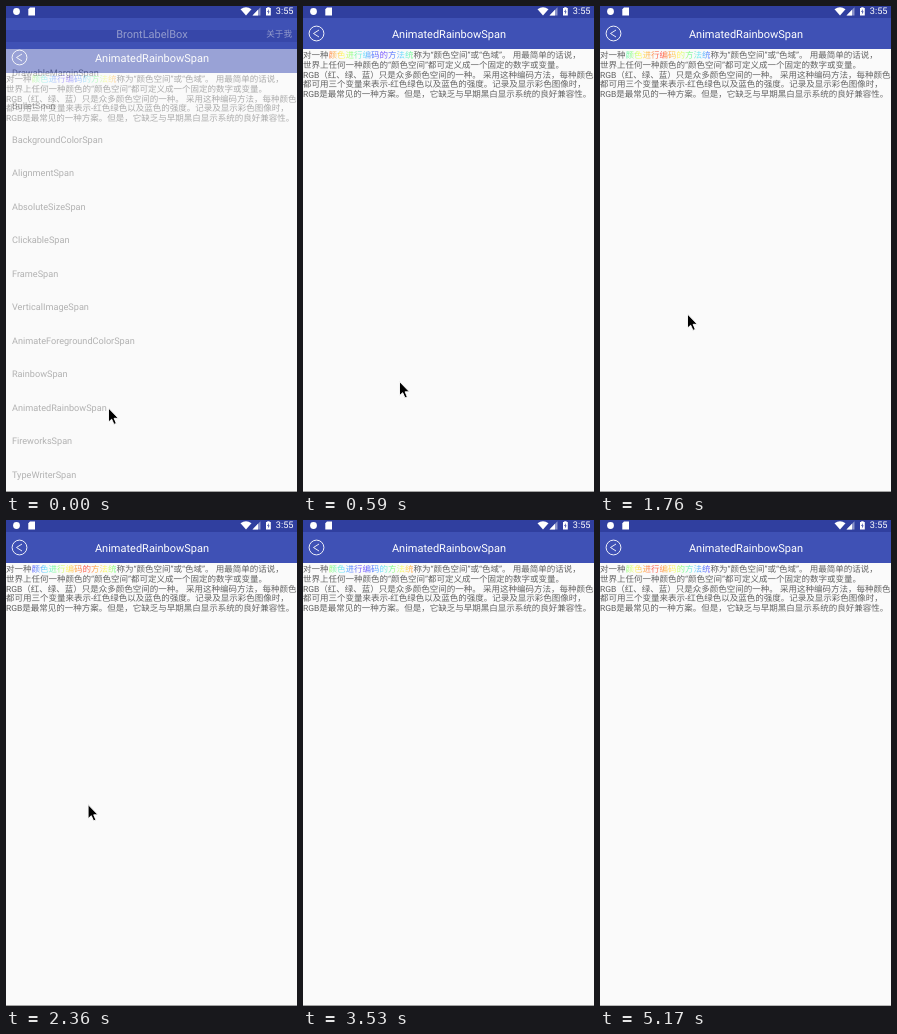
Recreate the animation shown at these times as an HTML page. Size 291 by 486 pixels, loop 5270 ms.

```html
<!DOCTYPE html>
<html lang="zh-CN">
<head>
<meta charset="utf-8">
<title>Rainbow span</title>
<style>
  html, body { margin: 0; width: 100%; height: 100%; overflow: hidden; }
  #stage {
    position: relative; width: 291px; height: 486px; overflow: hidden;
    background: #fafafa; white-space: nowrap;
    font-family: Roboto, "Noto Sans CJK SC", "Noto Sans CJK", sans-serif;
    text-rendering: geometricPrecision; text-spacing-trim: space-all;
  }
  #stage > *, .bar, .bar *, .body, .item { position: absolute; }
  .screen { left: 0; top: 0; width: 291px; height: 486px; background: #fafafa; }
  .strip { position: absolute; width: 291px; height: 12px; background: #303f9f; }
  .bar { top: 12px; width: 291px; height: 31px; background: #3f51b5; color: #fff; }
  .title { left: 0; width: 292px; top: 10px; font-size: 11px; line-height: 14px; text-align: center; }
  .about { right: 5px; top: 11px; font-size: 8.6px; line-height: 12px; }
  .back { left: 5px; top: 7px; }
  .item { left: 6px; font-size: 9.15px; line-height: 12px; color: #666; }
  .body { left: 0; top: 46px; font-size: 8.5px; line-height: 9.77px; color: #626262; }
  .rainbow {
    color: transparent;
    background: linear-gradient(90deg, #ff5252, #ffab50, #ffff6a, #7dff8a, #72e6ff, #5a7cff, #8358ff,
      #5a7cff, #72e6ff, #7dff8a, #ffff6a, #ffab50, #ff5252) 0 0 / 119px 100% repeat-x;
    -webkit-background-clip: text; background-clip: text;
  }
  #icons, #cursor { left: 0; top: 0; }
  #clock { right: 3.5px; top: 0; font-size: 9.2px; line-height: 11px; color: #fff; }
  #edge { left: 0; top: 485px; width: 291px; height: 1px; background: #a4a4a4; }
</style>
</head>
<body>
<div id="stage">
  <div class="screen" id="menu">
    <div class="strip"></div>
    <div class="bar"><div class="title">BrontLabelBox</div><div class="about">关于我</div></div>
  </div>
  <div class="screen" id="page">
    <div class="strip"></div>
    <div class="bar">
      <svg class="back" width="17" height="17" fill="none" stroke="#fff" stroke-width=".9">
        <circle cx="8.5" cy="8.5" r="7.4"/><path d="M11 5 5.5 8.5 11 12"/>
      </svg>
      <div class="title">AnimatedRainbowSpan</div>
    </div>
    <div class="body">对一种<span class="rainbow">颜色进行编码的方法统</span>称为“颜色空间”或“色域”。 用最简单的话说，<br>世界上任何一种颜色的“颜色空间”都可定义成一个固定的数字或变量。<br>RGB（红、绿、蓝）只是众多颜色空间的一种。 采用这种编码方法，每种颜色<br>都可用三个变量来表示-红色绿色以及蓝色的强度。记录及显示彩色图像时，<br>RGB是最常见的一种方案。但是，它缺乏与早期黑白显示系统的良好兼容性。</div>
  </div>
  <svg id="icons" width="291" height="12" fill="#fff">
    <circle cx="10.5" cy="5.5" r="3.4"/>
    <path d="M24 1.5H29V9.5H22.3V3.3Z"/>
    <path d="M234.5 3.2Q240 -.6 245.5 3.2L240 9.6Z"/>
    <path d="M254.5 1.2V9.5H246.5Z" opacity=".45"/>
    <path d="M252 3.8V9.5H246.5Z"/>
    <path d="M260 2H261.2V1.2H263.6V2H264.8V9.5H260Z"/>
    <path d="M263 3 261.1 6H262.3L261.8 8.4 263.7 5.4H262.5Z" fill="#303f9f"/>
  </svg>
  <div id="clock">3:55</div>
  <div id="edge"></div>
  <svg id="cursor" width="14" height="20">
    <path d="M.5 .6V14.6L3.7 11.7 6 16.9 8.3 15.9 6.1 10.8H10.4Z" fill="#000" stroke="#fff" stroke-width=".9"/>
  </svg>
</div>
<script>
  const LOOP = 5270, STEP = 147.7;
  const items = ["DrawableMarginSpan", "BulletSpan", "BackgroundColorSpan", "AlignmentSpan",
    "AbsoluteSizeSpan", "ClickableSpan", "FrameSpan", "VerticalImageSpan",
    "AnimateForegroundColorSpan", "RainbowSpan", "AnimatedRainbowSpan", "FireworksSpan",
    "TypeWriterSpan"];
  // Pointer path: [step, x, y]
  const path = [[0, 102, 401.5], [2, 101, 398], [4, 96, 375], [8, 87, 307.5],
    [15, 87, 307.5], [20, 60, 190], [21, 75, 220], [23, 198, 442]];

  const $ = s => document.querySelector(s);
  const menu = $("#menu"), page = $("#page"), rainbow = $(".rainbow");
  const cursor = $("#cursor"), edge = $("#edge");

  items.forEach((name, i) => {
    const el = document.createElement("div");
    el.className = "item";
    el.textContent = name;
    el.style.top = 62 + i * 33.46 + "px";
    menu.append(el);
  });

  function pointAt(n) {
    const k = Math.max(1, path.findIndex(p => p[0] >= n));
    const [a, b] = [path[k - 1], path[k]];
    const u = (n - a[0]) / (b[0] - a[0]);
    return [1, 2].map(j => a[j] + (b[j] - a[j]) * u);
  }

  function draw(n) {
    // The new screen rises and fades in, slowing down
    const t = 33 + n * STEP;
    const rise = 39 * Math.max(0, 1 - t / 350) ** 5;
    page.style.transform = `translateY(${Math.round(rise)}px)`;
    page.style.opacity = 1 - Math.max(0, 1 - t / 200) ** 4;

    rainbow.style.backgroundPositionX = 34 + (n - 12) * 4.92 + "px";

    const shown = n <= 23;
    cursor.style.visibility = shown ? "visible" : "hidden";
    if (shown) {
      const [x, y] = pointAt(n);
      cursor.style.transform = `translate(${x}px, ${y}px)`;
    }
    edge.style.background = n < 33 ? "#a4a4a4" : "#b8b8b8";
  }

  const start = performance.now();
  function tick() {
    const t = (performance.now() - start) % LOOP;
    draw(Math.floor((t + 18) / STEP));
    requestAnimationFrame(tick);
  }
  tick();
</script>
</body>
</html>
```
